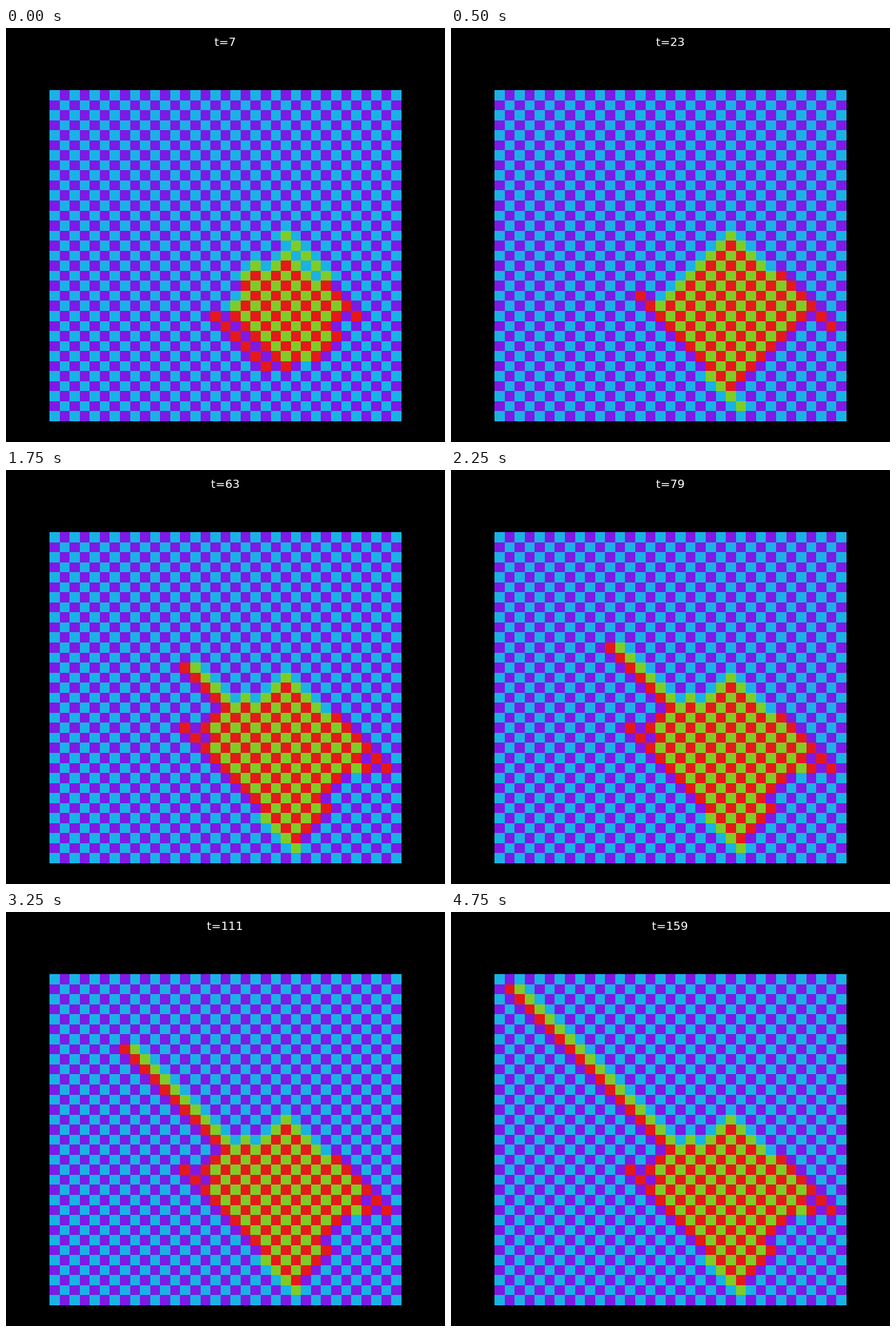
Recreate the animation shown at these times as an HTML page with a canvas. Size 636 by 600 pixels, loop 5000 ms.

```html
<!DOCTYPE html>
<html lang="en">
<head>
<meta charset="utf-8">
<title>Checkerboard growth</title>
<style>
  html, body { margin: 0; width: 100%; height: 100%; overflow: hidden; background: #000; }
  canvas { display: block; }
</style>
</head>
<body>
<canvas id="stage" width="636" height="600"></canvas>
<script>
const COLS = 35, ROWS = 33, STEPS = 20, STEP_MS = 250;
const LEFT = 63, TOP = 90, WIDTH = 510, HEIGHT = 480;
const OFF = ['#19b2e5', '#7f19e5'], ON = ['#e51919', '#7fcc26'];

// Diagonal coordinates: u = column + row, v = column - row.
const birth = new Map();
const key = (u, v) => u + ',' + v;
const birthOf = (u, v) => birth.get(key(u, v)) ?? Infinity;

// Lights a diagonal rectangle from the given step on.
function band(step, u0, u1, v0, v1 = v0) {
  for (let u = u0; u <= u1; u++) {
    for (let v = v0; v <= v1; v++) {
      birth.set(key(u, v), Math.min(birthOf(u, v), step));
    }
  }
}

// The diamond body grows by one ring per step.
for (let step = 0; step < 3; step++) band(step, 39 - step, 50 + step, -4 - step, 7 + step);

// Early rims of the body
band(0, 37, 45, 9);
band(0, 45, 52, 8);
band(0, 38, 48, -6);
band(0, 37, 40, 0, 3);
band(0, 51, 52, -1, 4);

// Spikes to the left, right and bottom
for (let step = 1; step < 4; step++) band(step + (step > 2), 38 - 2 * step, 38, -6);
band(1, 46, 56, 10);
band(1, 49, 55, -7);

// Late layers on the lower right and upper left sides
band(4, 53, 54, -7, 0);
band(4, 53, 54, 7, 8);
band(4, 36, 36, -4, 0);
band(6, 34, 36, -4, 0);
band(6, 35, 36, 1, 3);

// The long arm climbs one cell diagonally per step.
for (let step = 3; step < STEPS; step++) band(step, 40 - 2 * step, 41 - 2 * step, 0, 1);

const ctx = document.getElementById('stage').getContext('2d');
const edgeX = col => Math.round(LEFT + col * WIDTH / COLS);
const edgeY = row => Math.round(TOP + row * HEIGHT / ROWS);

function draw(step) {
  ctx.fillStyle = '#000';
  ctx.fillRect(0, 0, 636, 600);
  for (let r = 0; r < ROWS; r++) {
    for (let c = 0; c < COLS; c++) {
      const x = edgeX(c), y = edgeY(r);
      const palette = birthOf(c + r, c - r) <= step ? ON : OFF;
      ctx.fillStyle = palette[(r + c) % 2];
      ctx.fillRect(x, y, edgeX(c + 1) - x, edgeY(r + 1) - y);
    }
  }
  const label = 't=' + (7 + 8 * step);
  ctx.fillStyle = '#fff';
  ctx.font = '16.667px "DejaVu Sans", sans-serif';
  ctx.fillText(label, Math.floor(318 - ctx.measureText(label).width / 2), 26);
}

const start = performance.now();
let shown = -1;
function tick() {
  const step = Math.floor((performance.now() - start) / STEP_MS) % STEPS;
  if (step !== shown) draw(shown = step);
  requestAnimationFrame(tick);
}
tick();
</script>
</body>
</html>
```
